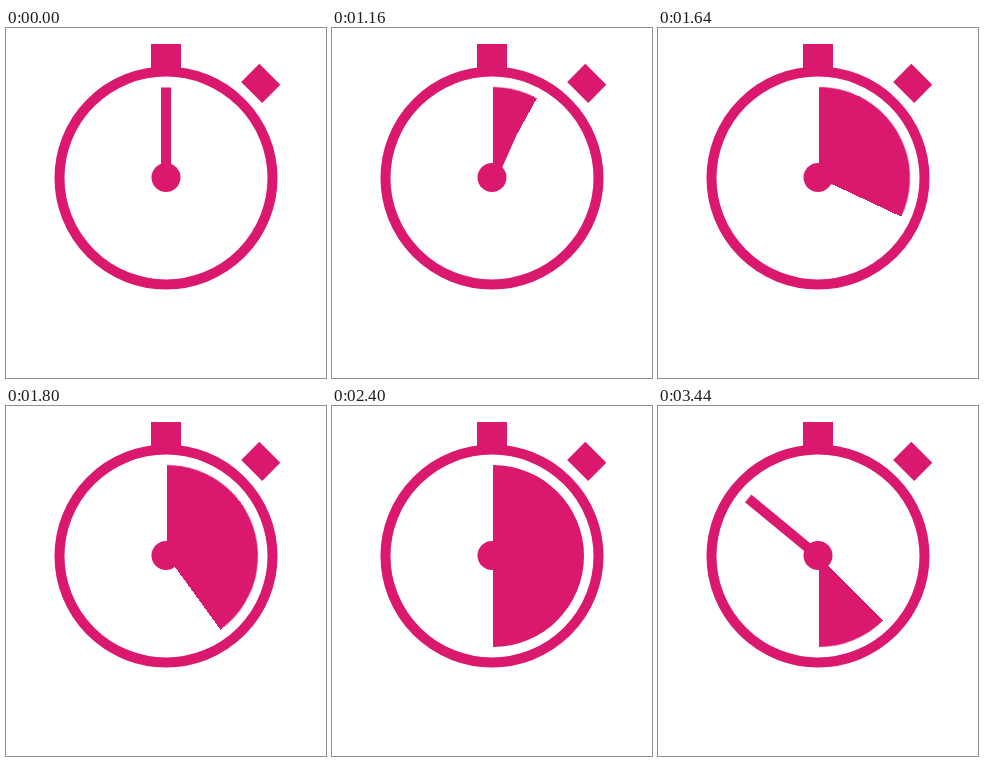
An HTML page without scripts that plays this animation: 320 px wide and 350 px high, repeating every 3.48 s.

```html
<!DOCTYPE html>
<html lang="en">
<head>
<meta charset="utf-8">
<title>Stopwatch</title>
<style>
  html, body { margin: 0; width: 100%; height: 100%; overflow: hidden; background: #fff; }
  svg { display: block; width: 320px; height: 350px; fill: #d9186e; }
  .ring { fill: none; stroke: #d9186e; stroke-width: 10; }
  .half, .hand { animation: 3480ms infinite step-end; }
  .half { transform-origin: 161px 150px; animation-name: sweep; }
  .hand { transform-origin: 160px 150px; animation-name: turn; }

  /* 25 pictures a second: one second out, a hold, a quick return */
  @keyframes sweep {
    0% { transform: rotate(0deg); }
    28.71% { transform: rotate(0deg); animation-timing-function: steps(25, end); }
    57.45% { transform: rotate(180deg); }
    95.38% { transform: rotate(180deg); animation-timing-function: steps(4, end); }
    100% { transform: rotate(360deg); }
  }
  @keyframes turn {
    0% { transform: rotate(0deg); }
    28.71% { transform: rotate(0deg); animation-timing-function: steps(25, end); }
    57.45% { transform: rotate(150deg); }
    75.84% { transform: rotate(150deg); animation-timing-function: steps(6, end); }
    90.78% { transform: rotate(158deg); }
    95.38% { transform: rotate(158deg); animation-timing-function: steps(4, end); }
    100% { transform: rotate(360deg); }
  }
</style>
</head>
<body>
<svg viewBox="0 0 320 350" role="img" aria-label="Stopwatch">
  <clipPath id="right"><rect x="161" y="50" width="100" height="200"/></clipPath>

  <rect x="145" y="16" width="30" height="26"/>
  <path d="M253.3 35.8l21 21-18.1 18.1-21-21z"/>
  <circle class="ring" cx="160" cy="150" r="106.5"/>

  <!-- a left half disc turning into the clipped right half -->
  <g clip-path="url(#right)">
    <path class="half" d="M161 59a91 91 0 0 0 0 182z"/>
  </g>
  <rect class="hand" x="155" y="59.5" width="10" height="90.5"/>
  <circle cx="160" cy="149.5" r="14.5"/>
</svg>
</body>
</html>
```
